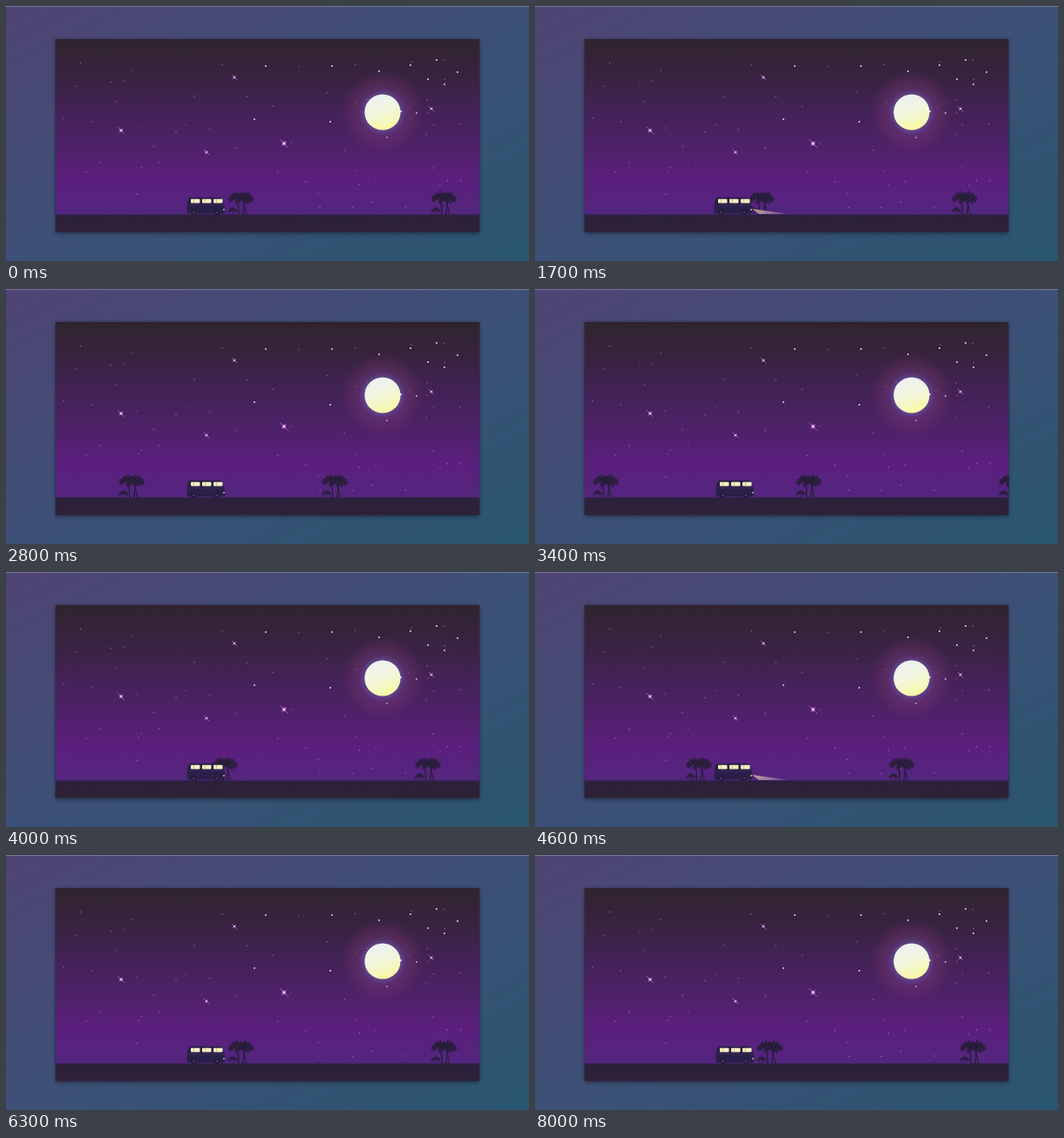
An HTML page with a canvas that plays this animation: 600 px wide and 293 px high, repeating every 8800 ms.

```html
<!DOCTYPE html>
<html lang="en">
<head>
<meta charset="utf-8">
<title>Night drive</title>
<style>
  html, body { margin: 0; width: 100%; height: 100%; overflow: hidden; }
  canvas { display: block; }
</style>
</head>
<body>
<canvas id="stage" width="600" height="293"></canvas>
<script>
const ctx = document.getElementById('stage').getContext('2d');
const LOOP = 8800, STEP = 100;
const GAP = 233;                            // distance between palm groves
const DRIVE = { start: 1610, time: 4430 };  // passes two groves
const BEAMS = [[400, 2200], [4500, 6300], [7200, 8000]];
const CARD = [56.7, 38, 486.6, 221.5], GROUND = 239.5;
const BODY = '#2a1f48', PALM = '#291e3c';

// Only the most prominent stars are placed by hand.
const BRIGHT = [[298, 69], [374, 69], [428, 75], [464, 68], [494, 62], [518, 76],
  [484, 84], [503, 90], [372, 133], [285, 130], [471, 123], [437, 151]];
const SPARKS = [[132, 143, 5], [262, 82, 4], [230, 168, 4], [319, 158, 6], [488, 118, 4]];

const clamp = v => Math.min(1, Math.max(0, v));

function seeded(seed) {
  return () => (seed = seed * 16807 % 2147483647) / 2147483647;
}

// Colours are spread evenly along the gradient.
function blend(gradient, ...colors) {
  colors.forEach((color, i) => gradient.addColorStop(i / (colors.length - 1), color));
  return gradient;
}

const linear = (x0, y0, x1, y1, ...colors) => blend(ctx.createLinearGradient(x0, y0, x1, y1), ...colors);
const radial = (x, y, r0, r1, ...colors) => blend(ctx.createRadialGradient(x, y, r0, x, y, r1), ...colors);

function rect(x, y, w, h, fill) {
  ctx.fillStyle = fill;
  ctx.fillRect(x, y, w, h);
}

function disc(x, y, r, fill) {
  ctx.fillStyle = fill;
  ctx.beginPath();
  ctx.arc(x, y, r, 0, Math.PI * 2);
  ctx.fill();
}

function shape(path, fill) {
  ctx.fillStyle = fill;
  ctx.fill(new Path2D(path));
}

function curve(x0, y0, cx, cy, x1, y1, width) {
  ctx.lineWidth = width;
  ctx.beginPath();
  ctx.moveTo(x0, y0);
  ctx.quadraticCurveTo(cx, cy, x1, y1);
  ctx.stroke();
}

function backdrop() {
  rect(0, 0, 600, 293, linear(184, -90, 416, 383, '#4f4474', '#3d5077', '#29566f'));
  rect(0, 0, 600, 1, 'rgba(190,190,200,.4)');
  ctx.save();
  ctx.shadowColor = 'rgba(0,0,0,.5)';
  ctx.shadowBlur = 5;
  ctx.shadowOffsetY = 1;
  rect(...CARD, '#30242f');
  ctx.restore();
}

function stars() {
  const random = seeded(41);
  for (let i = 0; i < 55; i++) {
    disc(66 + random() * 465, 60 + random() * 175, 0.7, 'rgba(225,180,235,.5)');
  }
  for (const [x, y] of BRIGHT) disc(x, y, 1, 'rgba(255,240,255,.85)');
  ctx.strokeStyle = 'rgba(225,150,245,.75)';
  for (const [x, y, r] of SPARKS) {
    const a = r * 0.8, b = r * 0.45;
    curve(x - a, y - a, x, y, x + a, y + a, 0.7);
    curve(x - b, y + b, x, y, x + b, y - b, 0.7);
    disc(x, y, r * 0.4, radial(x, y, 0, r * 0.4, '#fff0ff', 'rgba(220,110,250,.6)'));
  }
}

function moon() {
  const x = 432, y = 122;
  disc(x, y, 48, radial(x, y, 20, 48, 'rgba(120,100,185,.55)', 'rgba(112,58,128,.45)',
    'rgba(122,56,112,.32)', 'rgba(115,50,105,.18)', 'rgba(110,45,105,0)'));
  disc(x, y, 20.6, linear(425, 101, 439, 143, '#ecf0f5', '#f3f6dc', '#f8f99c'));
  disc(453, 121, 0.9, '#fff');
}

function palm(x, y, size, baseX) {
  curve(x, y, (x + baseX) / 2 + 1, y + 9, baseX, GROUND + 1, size * 0.16);
  // Fronds fan out from the crown and droop at the sides.
  for (let i = 0; i < 9; i++) {
    const angle = Math.PI * (0.8 + i * 0.175);
    const dx = Math.cos(angle) * size, dy = Math.sin(angle) * size * 0.5 + Math.abs(dx) * 0.35;
    curve(x, y, x + dx * 0.6, y + dy - size * 0.3, x + dx, y + dy, size * 0.22);
  }
}

function grove(x) {
  ctx.strokeStyle = PALM;
  ctx.lineCap = 'round';
  palm(x + 11, 219, 9.5, x + 13);
  palm(x + 20, 219, 9.5, x + 17.5);
  palm(x + 17, 222, 8, x + 22);
  palm(x + 6, 234, 5, x + 7.5);
}

function beam(power) {
  ctx.globalAlpha = power;
  shape('M249 233 L288 238.5 L286 239.5 L257 239 Z',
    linear(249, 0, 288, 0, 'rgba(235,210,175,.75)', 'rgba(195,160,170,.65)', 'rgba(165,125,170,.35)'));
  ctx.globalAlpha = 1;
}

function van(x) {
  ctx.save();
  ctx.translate(x, 0);
  shape('M0 226 Q1 220 4 219.7 H36 Q39 220 40 222 L43 230 L43.5 237 L42 238.5 H1 Q-.5 238 -.5 234 Z', BODY);
  rect(1, 228.5, 41, 0.6, '#3f315c');
  for (const left of [4, 17, 30]) {
    ctx.fillStyle = '#f6efc0';
    ctx.beginPath();
    ctx.roundRect(left, 221.8, 10.5, 4.6, 1);
    ctx.fill();
    rect(left + 3, 221.8, 0.5, 4.6, '#968b80');
  }
  for (const wheel of [7.5, 34]) {
    disc(wheel, 237, 3.3, '#241a3a');
    disc(wheel, 237, 1.3, '#4a3c5c');
  }
  disc(42, 234, 0.9, '#d6c4a2');
  ctx.restore();
}

function draw(t) {
  const drive = clamp((t - DRIVE.start) / DRIVE.time) * 2 * GAP % GAP;
  const lit = BEAMS.find(([on, off]) => t >= on && t < off);
  const power = lit ? clamp((t - lit[0] + STEP) / (2 * STEP)) : 0;
  backdrop();
  ctx.save();
  ctx.beginPath();
  ctx.rect(...CARD);
  ctx.clip();
  rect(...CARD, linear(0, 38, 0, 241, '#30242f', '#38233f', '#432256', '#4e2168', '#5c1f7e', '#52267f'));
  stars();
  moon();
  for (let i = 0; i < 3; i++) grove(254 - drive + i * GAP);
  beam(power);
  van(208 - 2 * power);
  rect(CARD[0], GROUND, CARD[2], 21, linear(0, 240, 0, 260, '#2c203d', '#2d2235'));
  ctx.restore();
}

function tick(now) {
  draw(Math.floor(now % LOOP / STEP) * STEP);
  requestAnimationFrame(tick);
}
requestAnimationFrame(tick);
</script>
</body>
</html>
```
